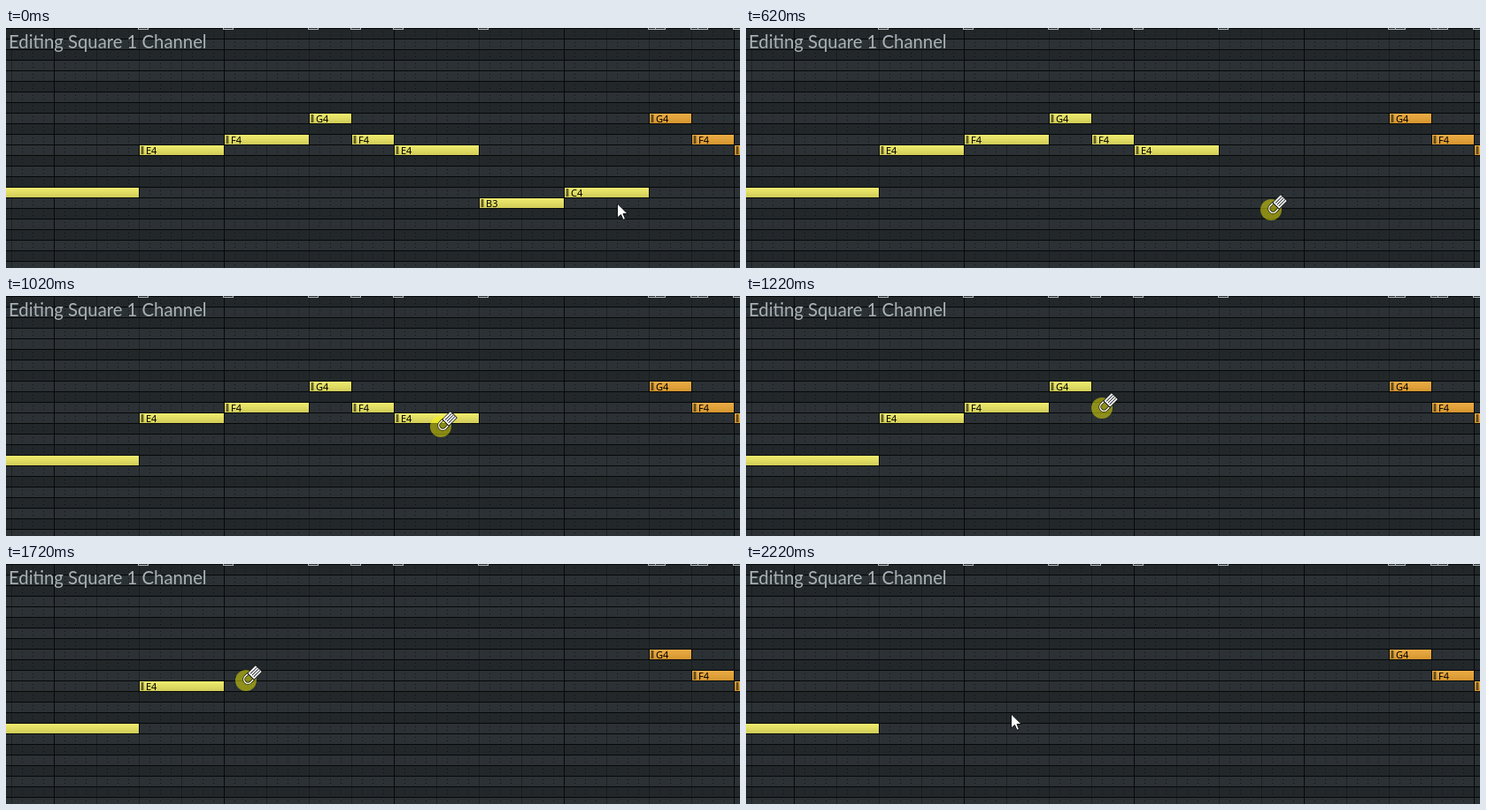
These frames come from a looping animation (829 px wide and 272 px high, 2320 ms). An HTML page with a canvas:

```html
<!DOCTYPE html>
<html lang="en">
<head>
<meta charset="utf-8">
<title>Piano roll</title>
<style>
html, body { margin: 0; width: 829px; height: 272px; overflow: hidden; background: #22272a; }
canvas { display: block; }
</style>
</head>
<body>
<canvas id="stage" width="829" height="272"></canvas>
<script>
const W = 829, H = 272, ROW = 12, BEAT = 48, LOOP = 2320, LAST_STEP = 22;
const ERASE_FROM = 2, ERASE_TO = 19;
const LINE = '#060808';
const SCALE = ['C', 'C#', 'D', 'D#', 'E', 'F', 'F#', 'G', 'G#', 'A', 'A#', 'B'];
const MELODY = 'C4:4 E4:2 F4:2 G4:1 F4:1 E4:2 B3:2 C4:2 G4:1 F4:1 E4:1';

const canvas = document.getElementById('stage');
const ctx = canvas.getContext('2d');

// pointer keys: step, x, y
const keys = [
  [0, 691, 199], [2, 681, 184], [4, 679, 184], [6, 593, 206], [10, 491, 148],
  [12, 402, 127], [14, 381, 109], [15, 360, 101], [17, 271, 132],
  [19, 190, 137], [22, 300, 170]
];

function pointerAt(step) {
  const i = Math.max(1, keys.findIndex(k => k[0] >= step));
  const [s0, x0, y0] = keys[i - 1], [s1, x1, y1] = keys[i];
  const p = (step - s0) / (s1 - s0);
  return [x0 + (x1 - x0) * p, y0 + (y1 - y0) * p];
}

// A note goes when the dragged eraser first runs over it.
function erasedAt({ x, y, w }) {
  for (let s = ERASE_FROM; s <= ERASE_TO; s += 0.05) {
    const [px, py] = pointerAt(s);
    if (px >= x && px < x + w && py >= y && py < y + ROW) return s;
  }
  return Infinity;
}

function parseMelody() {
  let x = -41;
  return MELODY.split(' ').map(item => {
    const [name, beats] = item.split(':');
    const pitch = SCALE.indexOf(name[0]) + 12 * name[1];
    const note = { name, x, y: (63 - pitch) * ROW, w: beats * BEAT - 1, late: x > 700 };
    x += beats * BEAT;
    note.gone = erasedAt(note);
    return note;
  });
}

function rect(x, y, w, h, fill, c = ctx) {
  c.fillStyle = fill;
  c.fillRect(x, y, w, h);
}

function makeGrid() {
  const grid = document.createElement('canvas');
  grid.width = W;
  grid.height = H;
  const g = grid.getContext('2d');
  for (let y = 0, pitch = 63; y < H; y += ROW, pitch--) {
    const sharp = SCALE[pitch % 12].length > 1;
    rect(0, y, W, ROW, sharp ? '#22272a' : '#2b3134', g);
  }
  for (let x = 6; x < W; x += ROW) {
    if ((x - 6) % BEAT === 0) rect(x, 0, 1, H, 'rgba(12,15,17,0.4)', g);
    else for (let y = 0; y < H; y += 4) rect(x, y, 1, 1, 'rgba(8,10,12,0.7)', g);
  }
  for (let y = 0; y < H; y += ROW) rect(0, y, W, 1, LINE, g);
  for (let x = 54; x < W; x += BEAT * 4) rect(x, 0, 1, H, LINE, g);
  return grid;
}

function drawTab(x) {
  rect(x, 0, 12, 2, '#aeb3b5');
  rect(x + 1, 0, 10, 1, '#22272a');
}

function drawNote({ name, x, y, w, late }) {
  const hue = late ? 37 : 58;
  const fill = ctx.createLinearGradient(0, y + 1, 0, y + 12);
  fill.addColorStop(0, `hsl(${hue} 82% ${late ? 60 : 69}%)`);
  fill.addColorStop(1, `hsl(${hue} ${late ? 66 : 56}% ${late ? 51 : 58}%)`);
  rect(x - 1, y, w + 2, ROW + 1, LINE);
  rect(x, y + 1, w, 11, fill);
  rect(x + 1, y + 2, 4, 9, 'rgba(40,38,15,0.3)');
  rect(x + 2, y + 2, 2, 9, 'rgba(40,38,15,0.55)');
  ctx.font = '11px "Noto Sans", "Open Sans", sans-serif';
  ctx.fillStyle = '#000';
  ctx.fillText(name, x + 7, y + 11);
}

function drawTitle() {
  ctx.font = '20.3px Lato, sans-serif';
  ctx.fillStyle = '#aab2b7';
  ctx.fillText('Editing Square 1 Channel', 3, 23);
}

function drawArrow(x, y) {
  const pts = [[0, 0], [0, 16], [4, 12.5], [6.5, 18.3], [9, 17.3], [6.5, 11.5], [11.5, 11.5]];
  ctx.beginPath();
  for (const [dx, dy] of pts) ctx.lineTo(x + dx - 0.5, y + dy);
  ctx.closePath();
  ctx.fillStyle = '#fff';
  ctx.fill();
  ctx.lineWidth = 1;
  ctx.strokeStyle = '#111';
  ctx.stroke();
}

function drawEraser(x, y) {
  ctx.fillStyle = 'rgba(255,250,0,0.47)';
  ctx.beginPath();
  ctx.arc(x, y, 12, 0, Math.PI * 2);
  ctx.fill();

  ctx.save();
  ctx.translate(x + 0.5, y + 0.5);
  ctx.rotate(-Math.PI / 4);
  ctx.beginPath();
  ctx.roundRect(-2, -4.5, 13, 9, 4.5);
  for (const [width, color] of [[3, '#25260e'], [1.4, '#fffff0']]) {
    ctx.lineWidth = width;
    ctx.strokeStyle = color;
    ctx.stroke();
  }
  rect(6.5, -5.5, 14, 11, '#15171a');
  rect(7.5, -4.8, 12, 9.6, '#fff');
  for (let dy = -2.9; dy < 4; dy += 2.5) rect(9, dy, 10.5, 0.9, '#202326');
  ctx.restore();
}

const grid = makeGrid();
const notes = parseMelody();

function render(ms) {
  const t = ms % LOOP;
  const step = t < 100 ? 0 : Math.max(1, Math.min(LAST_STEP, Math.floor((t - 20) / 100)));
  ctx.drawImage(grid, 0, 0);
  for (const note of notes) {
    if (note.x < 600 || note.late) drawTab(note.x - 2);
    if (note.late) drawTab(note.x + 6);
    if (step < note.gone) drawNote(note);
  }
  drawTitle();
  const erasing = step >= ERASE_FROM && step <= ERASE_TO;
  (erasing ? drawEraser : drawArrow)(...pointerAt(step));
}

function tick() {
  render(performance.now());
  requestAnimationFrame(tick);
}
tick();
</script>
</body>
</html>
```
